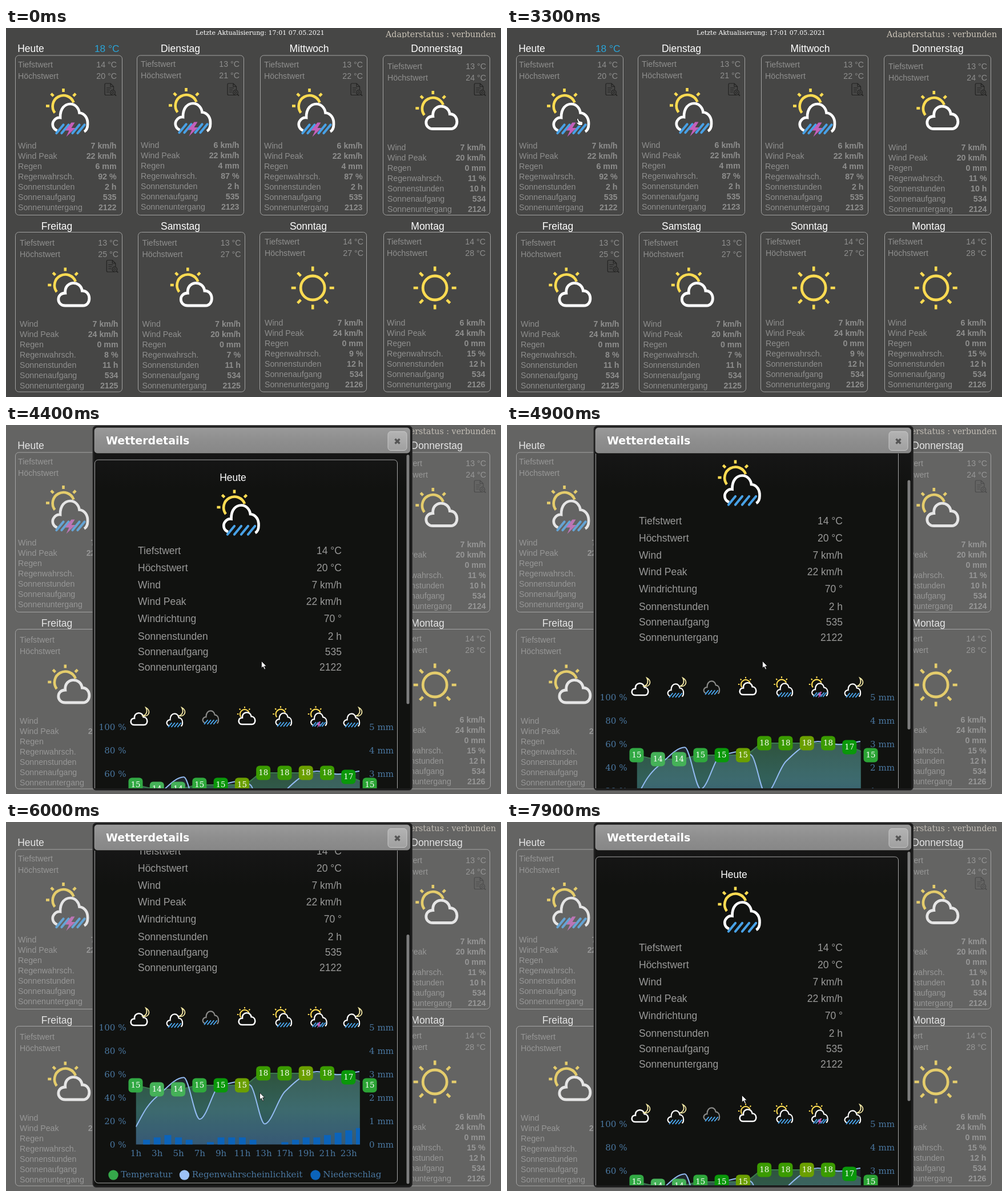
These frames come from a looping animation (867 by 646 pixels, 8 s). An HTML page:

```html
<!DOCTYPE html>
<html lang="de">
<head>
<meta charset="utf-8">
<title>Wetter</title>
<style>
html, body { margin: 0; width: 100%; height: 100%; overflow: hidden; background: #464645; }
svg { display: block; width: 867px; height: 646px; }
text { font-family: "Liberation Sans", Arial, sans-serif; white-space: pre; }
.row { font-size: 14.2px; fill: #8f8f8e; }
.val { font-size: 14.2px; fill: #8e8e8d; font-weight: bold; }
.head { font-size: 17.5px; fill: #fff; }
.now { font-size: 17.3px; fill: #29a6da; }
.big { font-size: 17.5px; fill: #999998; }
.serif { font-family: "DejaVu Serif", serif; font-size: 11px; fill: #fff; }
.state { font-family: "DejaVu Serif", serif; font-size: 14.25px; fill: #cbc4b8; }
.axis { font-family: "DejaVu Serif", serif; font-size: 15.1px; fill: #4a77a0; }
.badge { font-family: "DejaVu Serif", serif; font-size: 13.4px; fill: #fff; }
.title { font-family: "DejaVu Sans", sans-serif; font-size: 19px; font-weight: bold; fill: #fff; }
</style>
</head>
<body>
<svg id="stage" viewBox="0 0 867 646"></svg>
<script>
const YELLOW = '#fddb52', BLUE = '#48a1e6', LOOP = 8000;

const text = (x, y, s, cls, anchor = 'start') =>
  `<text x="${x}" y="${y}" class="${cls}" text-anchor="${anchor}">${s}</text>`;
const rect = (x, y, w, h, rx, attrs = '') =>
  `<rect x="${x}" y="${y}" width="${w}" height="${h}" rx="${rx}" ${attrs}/>`;
const line = (d, color, w, cap = 'butt') =>
  `<path d="${d}" fill="none" stroke="${color}" stroke-width="${w}" stroke-linecap="${cap}"/>`;
const place = (x, y, s, ...parts) =>
  `<g transform="translate(${x} ${y}) scale(${s})">${parts.join('')}</g>`;

// Weather symbols, drawn around the centre of the sun
function rays(from, to, first, count) {
  let d = '';
  for (let i = 0; i < count; i++) {
    const a = (first + i * 45) * Math.PI / 180, c = Math.cos(a), s = Math.sin(a);
    d += `M${c * from} ${s * from}L${c * to} ${s * to}`;
  }
  return line(d, YELLOW, 4.6);
}
const strokes = (...xs) => line(xs.map(x => `M${x} 47.5l12 -14.5`).join(''), BLUE, 4.3, 'round');

const halfSun = line('M-15 12A19 19 0 1 1 18 -6', YELLOW, 4.6) + rays(24.5, 30.5, 180, 4);
const fullSun = `<circle r="21" fill="none" stroke="${YELLOW}" stroke-width="4.8"/>` + rays(29.5, 37.5, 0, 8);
const cloud = line('M0 36C-16 36 -16 14 0 14C-2 -8 27 -9 29.5 10C46 10 46 36 31 36Z', '#fff', 4.8);
const openCloud = (color = '#fff') => line(
  'M-11 43C-19 40 -21 31 -16 25C-13 21 -9 20 -5.5 20.5C-6 4 3 -3.5 12 -3.5C21 -3.5 27 4 28 12C38 13 43 22 42.5 32C42.5 39 40 43 36.5 45',
  color, 4.7);
const rain = strokes(-12, 0, 12, 24);
const storm = strokes(-12, -3, 16, 25) + '<path d="M14 29L3 43H10L5 54L21 38.5H14L20 29Z" fill="#c45fba"/>';
const moon = line('M40 -27C60 -17 54 9 29 5C44 -1 47 -14 40 -27Z', '#f7eaa6', 4);

const icons = {
  storm: { art: halfSun + openCloud() + storm, dx: -93.5, dy: 72.5 },
  rain: { art: halfSun + openCloud() + rain },
  cloudy: { art: halfSun + cloud, dx: -93.2, dy: 74 },
  sunny: { art: fullSun, dx: -88.8, dy: 81 }
};

const note = (x, y) => place(x, y, 1,
  line('M4 10.5H-7Q-9 10.5 -9 8.5V-8Q-9 -10 -7 -10H1L6.5 -4.5V1M1 -10V-4.5H6.5M-6 -2H2M-6 1.5H0M-6 5H-1', '#232322', 1.2),
  '<circle cx="5" cy="6" r="4.3" fill="none" stroke="#232322" stroke-width="1.2"/><circle cx="5" cy="6" r="1.8" fill="none" stroke="#232322"/>',
  line('M8 9.2L11 11.5', '#232322', 1.6));

// Overview cards
const labels = ['Tiefstwert', 'Höchstwert', 'Wind', 'Wind Peak', 'Regen', 'Regenwahrsch.',
  'Sonnenstunden', 'Sonnenaufgang', 'Sonnenuntergang'];
const units = [' °C', ' °C', ' km/h', ' km/h', ' mm', ' %', ' h', '', ''];

const cards = [
  { day: 'Heute', mid: 43.5, box: 16.5, x: 21, y: 64, icon: 'storm', values: '14 20 7 22 6 92 2 535 2122' },
  { day: 'Dienstag', mid: 305.5, box: 229.5, x: 236, y: 63, icon: 'storm', values: '13 21 6 22 4 87 2 535 2123' },
  { day: 'Mittwoch', mid: 531, box: 445.5, x: 452, y: 64, icon: 'storm', values: '13 22 6 22 4 87 2 535 2123' },
  { day: 'Donnerstag', mid: 754.5, box: 660.5, x: 668, y: 66.5, icon: 'cloudy', values: '13 24 7 20 0 11 10 534 2124' },
  { day: 'Freitag', mid: 89, box: 16.5, x: 24, y: 376, icon: 'cloudy', values: '13 25 7 24 0 8 11 534 2125' },
  { day: 'Samstag', mid: 305.5, box: 231.5, x: 238.5, y: 376, icon: 'cloudy', values: '13 27 7 20 0 7 11 534 2125' },
  { day: 'Sonntag', mid: 529.5, box: 444.5, x: 453, y: 374, icon: 'sunny', values: '14 27 7 24 0 9 12 534 2126' },
  { day: 'Montag', mid: 738.5, box: 661.5, x: 667, y: 374, icon: 'sunny', values: '14 28 6 24 0 15 12 534 2126' }
];

function card(c, i) {
  const top = i < 4 ? 48 : 357.5, right = c.x + 173, icon = icons[c.icon], cx = right + icon.dx;
  let s = text(c.mid, top - (i < 4 ? 6.5 : 5), c.day, 'head', 'middle') +
    rect(c.box, top, 187, 279.5, 6, 'fill="none" stroke="#a2a2a1"');
  c.values.split(' ').forEach((v, k) => {
    const temp = k < 2, y = c.y + 5 + (temp ? k * 20 : 142 + (k - 2) * 18.05);
    s += text(c.x, y, labels[k], 'row') +
      text(right - (temp ? 0 : .5), y, v + units[k], temp ? 'row' : 'val', 'end');
  });
  if (i < 5) s += note(cx + 81.5, top + 59);
  return s + place(cx, c.y + icon.dy, 1, icon.art);
}

// Chart of the details; x counts in hours from the left edge
const BASE = 733.5, X0 = 227.5, STEP = 18.64;
const chance = [[0, 15], [1, 31], [2, 41], [4.5, 57], [6, 21.5], [8, 51], [10.8, 50], [12.1, 17.5], [14, 45], [17, 62], [19, 59.5], [21, 62]];
const temps = [15, 14, 14, 15, 15, 15, 18, 18, 18, 18, 17, 15];
const tints = ['#32a944', '#45b158', '#45b158', '#2fa83c', '#0a980a', '#6b9f00',
  '#3b9b00', '#3b9b00', '#6b9f00', '#3b9b00', '#0a980a', '#2ca435'];
const drops = i => Math.round(i > 12 ? Math.max(0, 1 + (i - 14) * .8) : (i < 6 ? 4 : 3) * Math.abs(Math.sin(i * Math.PI / 6)));
const hourX = h => X0 + h * STEP;
const tempY = v => 630 - (v - 15) * 7;

// Smooth curve that is level at its peaks and dips
function spline(pts) {
  const rise = (a, b) => (b[1] - a[1]) / (b[0] - a[0]);
  const slope = i => {
    const p = pts[i - 1], q = pts[i], r = pts[i + 1];
    if (!p) return rise(q, r);
    if (!r) return rise(p, q);
    return rise(p, q) * rise(q, r) > 0 ? rise(p, r) : 0;
  };
  return pts.map(([x, y], i) => {
    if (!i) return `M${x} ${y}`;
    const [px, py] = pts[i - 1], d = (x - px) / 3;
    return `C${px + d} ${py + d * slope(i - 1)} ${x - d} ${y - d * slope(i)} ${x} ${y}`;
  }).join('');
}

function chart() {
  const warm = spline(temps.map((v, i) => [hourX(i * 2), tempY(v)]));
  const wet = spline(chance.map(([h, p]) => [hourX(h), BASE - p * 2.055]));
  let s = `<g clip-path="url(#plot)"><path d="${warm}V${BASE}H${X0}Z" fill="url(#warm)"/>` +
    `<path d="${wet}V${BASE}H${X0}Z" fill="#8ab4f8" opacity=".12"/>`;
  for (let i = 1; i < 22; i++) {
    const h = drops(i) * 4.1;
    s += rect(hourX(i) - 6, BASE - h, 12, h, 0, 'fill="#0b63ba"');
  }
  s += line(warm, '#3b7a4d', 2) + line(wet, '#93bbf2', 2) + '</g>';
  for (let i = 0; i <= 5; i++) {
    const y = BASE - i * 41.1 + 5.5;
    s += text(210.5, y, i * 20 + ' %', 'axis', 'end') + text(636, y, i + ' mm', 'axis');
  }
  for (let i = 0; i < 11; i++) s += text(hourX(i * 2), 753.5, i * 2 + (i < 7 ? 1 : 3) + 'h', 'axis', 'middle');
  temps.forEach((v, i) => {
    const x = hourX(i * 2) - .5, y = tempY(v);
    s += rect(x - 12.5, y - 12.5, 25, 25, 6, `fill="${tints[i]}"`) + text(x, y + 4, v, 'badge', 'middle');
  });
  [['Temperatur', 188, '#35a84a'], ['Regenwahrscheinlichkeit', 312.5, '#9cc1f7'], ['Niederschlag', 542, '#0b63ba']]
    .forEach(([name, x, color]) => {
      s += `<circle cx="${x}" cy="787" r="8.7" fill="${color}"/>` + text(x + 13.2, 791, name, 'axis');
    });
  return s;
}

function details() {
  const rows = [['Tiefstwert', '14 °C', 220], ['Höchstwert', '20 °C', 250], ['Wind', '7 km/h', 279.5],
    ['Wind Peak', '22 km/h', 309], ['Windrichtung', '70 °', 338.5], ['Sonnenstunden', '2 h', 369.3],
    ['Sonnenaufgang', '535', 397], ['Sonnenuntergang', '2122', 424]];
  const hours = [
    place(-7, 0, .53, cloud) + place(-5, 1, .45, moon),
    place(0, 1, .45, moon, openCloud(), rain),
    place(1, -4, .45, openCloud('#8b8b89'), rain),
    place(4, 0, .43, halfSun) + place(0, -1, .53, cloud),
    place(5, 0, .45, icons.rain.art),
    place(4.5, 0, .45, icons.storm.art),
    place(0, 1, .45, moon, openCloud(), rain)
  ];
  return rect(155.5, 61, 530, 740, 6, 'fill="none" stroke="#a5a5a5"') +
    text(397.5, 98, 'Heute', 'head', 'middle') + place(400, 144, 1, icons.rain.art) +
    rows.map(([a, b, y]) => text(231, y + 6.3, a, 'big') + text(588, y + 6.3, b, 'big', 'end')).join('') +
    hours.map((art, i) => place(228 + i * 62 + (i === 0 ? 4 : 0), 506, 1, art)).join('') + chart();
}

const clip = (id, ...box) => `<clipPath id="${id}">${rect(...box, 0)}</clipPath>`;
const gradient = (id, ...stops) => `<linearGradient id="${id}" x2="0" y2="1">` +
  stops.map((c, i) => `<stop offset="${i / (stops.length - 1)}" stop-color="${c}"/>`).join('') + '</linearGradient>';
const pointer = (id, d) => `<path id="${id}" d="${d}" fill="#fff" stroke="#1a1a1a" stroke-width=".9"/>`;

const stage = document.getElementById('stage');
stage.innerHTML = '<defs>' +
  gradient('bar', '#999', '#8e8e8e', '#878787') + gradient('button', '#b3b3b3', '#a0a0a0') +
  gradient('gloss', '#161616', '#111210') + gradient('warm', '#2f543e', '#32605a', '#2a4c62') +
  clip('plot', X0, 500, 392.5, 234) + clip('view', 152, 50, 556, 586) + clip('status', 650, 0, 217, 17.5) + '</defs>' +
  rect(0, 0, 867, 646, 0, 'fill="#464645"') +
  text(332, 11.5, 'Letzte Aktualisierung: 17:01 07.05.2021', 'serif') +
  `<g clip-path="url(#status)">${text(665, 16, 'Adapterstatus : verbunden', 'state')}</g>` +
  text(155, 42, '18 °C', 'now') + cards.map(card).join('') +
  '<g id="popup">' + rect(0, 0, 867, 646, 0, 'fill="#aaa" opacity=".3"') +
  rect(152, 1.5, 559.5, 638, 6, 'fill="#1c1c1c" stroke="#333"') + rect(155, 49, 553, 587, 0, 'fill="#111210"') +
  rect(155, 50, 553, 62, 0, 'fill="url(#gloss)"') +
  `<g clip-path="url(#view)"><g id="page">${details()}</g></g>` +
  rect(155, 5, 552.5, 44, 5, 'fill="url(#bar)" stroke="#a0a0a0" stroke-width=".7"') +
  text(175, 34, 'Wetterdetails', 'title') +
  rect(669, 11.5, 33, 33, 5, 'fill="url(#button)" stroke="#c8c8c8"') +
  line('M681.5 24.5l8 8M689.5 24.5l-8 8', '#555', 3.4) +
  '<rect id="thumb" x="701.5" width="5" height="436.5" rx="2.5" fill="#7d7d7d"/></g>' +
  pointer('arrow', 'M0 0V12L2.8 9.5L5 14.3L7 13.4L4.9 8.8L8.6 8.6Z') +
  pointer('hand', 'M1.2 .6Q2.6 -.4 3.4 1L5 4.6L10 6Q11.5 6.6 11.2 8.4L10.4 12.5H4.6L.2 8.6Q-.6 7.2 1 7L3 7.6L.9 2Z');

// Pointer glides: from time, to time, x, y
const SHOWN = 500, OPENED = 3500;
const glides = [
  [500, 900, 178, 217], [1100, 1300, 182, 217], [1500, 1600, 191, 207], [1700, 1900, 338, 168],
  [2000, 2400, 141, 154], [2500, 2700, 117, 169], [3200, 3300, 121.5, 158], [3400, 3500, 125, 158.5],
  [4100, 4400, 447.5, 413.5], [5600, 5800, 480, 515], [5800, 6000, 444.5, 474],
  [6100, 6300, 475, 512], [6300, 6400, 432.5, 486], [7200, 7900, 411.5, 478.5]
];
const ramp = (t, a, b) => Math.min(1, Math.max(0, (t - a) / (b - a)));

function pointerAt(t) {
  let x = 163, y = 112;
  for (const [a, b, toX, toY] of glides) {
    const u = ramp(t, a, b);
    x += (toX - x) * u;
    y += (toY - y) * u;
  }
  return [x, y];
}

function scrollAt(t) {
  const down = 1 - (1 - ramp(t, 4700, 5500)) ** 1.28, up = ramp(t, 6900, 7800) ** 1.48;
  return Math.round(169 * (down - up));
}

const el = id => document.getElementById(id);
const show = (id, on) => el(id).setAttribute('visibility', on ? 'visible' : 'hidden');

function draw(ms) {
  const t = Math.floor(ms % LOOP / 100) * 100, open = t >= OPENED;
  const y = scrollAt(t), [px, py] = pointerAt(t), hand = !open && px < 150;
  show('popup', open);
  el('page').setAttribute('transform', `translate(0 ${-y})`);
  el('thumb').setAttribute('y', 52 + y * .858);
  show('hand', hand);
  show('arrow', t >= SHOWN && !hand);
  el(hand ? 'hand' : 'arrow').setAttribute('transform', `translate(${px} ${py})`);
}

let start;
function tick(now) {
  start ??= now;
  draw(now - start);
  requestAnimationFrame(tick);
}
draw(0);
requestAnimationFrame(tick);
</script>
</body>
</html>
```
